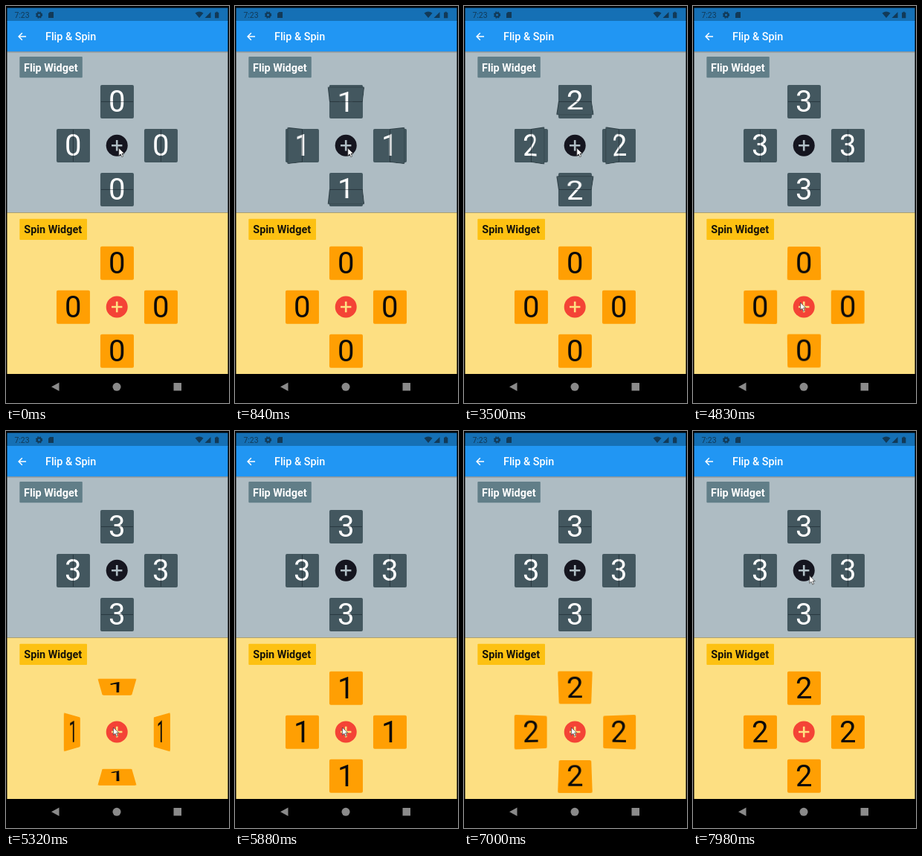
An HTML page that plays this animation: 300x533 px, repeating every 8 s.

```html
<!DOCTYPE html>
<html lang="en">
<head>
<meta charset="utf-8">
<title>Flip &amp; Spin</title>
<style>
  html, body { margin: 0; width: 100%; height: 100%; overflow: hidden; background: #000; }
  #stage { position: relative; width: 300px; height: 533px; overflow: hidden; font-family: Roboto, sans-serif; }
  svg { position: absolute; left: 0; top: 0; }
  .card, .face { position: absolute; left: 0; top: 0; width: 44.5px; height: 44.5px; }
  .face { border-radius: 2px; font: 400 40px/46px Roboto, sans-serif; text-align: center; }
  .flip .face { background: #43575f; color: #fff; }
  .spin .face { background: #ff9f03; color: #0a0a0a; }
  .flap { box-shadow: inset 0 0 0 1px rgba(30, 42, 48, .5); }
  .hinge { position: absolute; background: rgba(12, 22, 27, .45); }
</style>
</head>
<body>
<div id="stage">
  <svg width="300" height="533" viewBox="0 0 300 533">
    <defs>
      <linearGradient id="shade" x2="0" y2="1">
        <stop stop-opacity=".25"/>
        <stop offset="1" stop-opacity="0"/>
      </linearGradient>
    </defs>
    <rect width="300" height="533"/>
    <rect x="1.500" y="2.500" width="297" height="18" fill="#1570b5"/>
    <rect x="1.500" y="20" width="297" height="41" fill="#2196f3"/>
    <rect x="1.500" y="61" width="297" height="216.500" fill="#aebcc3"/>
    <rect x="1.500" y="61" width="297" height="2.500" fill="url(#shade)"/>
    <rect x="1.500" y="277.500" width="297" height="216.500" fill="#fddf82"/>

    <g fill="#123a58">
      <text x="11.500" y="15.900" font-size="10.400">7:23</text>
      <circle cx="44.500" cy="12" r="2.700" fill="none" stroke="#123a58" stroke-width="2.200"/>
      <circle cx="44.500" cy="12" r="4.100" fill="none" stroke="#123a58" stroke-width="1.200" stroke-dasharray="1.650 1.650"/>
      <path d="M59 8H64V16H57V10Z"/>
      <path d="M254.500 9.500Q260 5.500 265.500 9.500L260 16Z"/>
      <path d="M275.500 8V16H267.500Z"/>
      <path d="M281 8.800H282.500V7.800H284.800V8.800H286.300V16.300H281Z"/>
    </g>

    <path d="M27 41H17.500M21.800 36.300L17.100 41L21.800 45.700" fill="none" stroke="#fff" stroke-width="1.500"/>
    <text x="53" y="46" font-size="14.400" font-weight="500" fill="#fff">Flip &amp; Spin</text>

    <rect x="18.300" y="68" width="84.500" height="28.300" rx="1" fill="#617e88"/>
    <text x="24" y="87.500" font-size="14.400" font-weight="700" fill="#fff">Flip Widget</text>
    <rect x="18.300" y="285.700" width="90.700" height="28.300" rx="1" fill="#fdc112"/>
    <text x="24.300" y="305" font-size="14.400" font-weight="700" fill="#15120a">Spin Widget</text>

    <circle cx="149.200" cy="187.300" r="14.500" fill="#15151f"/>
    <path d="M142 187.300H156.400M149.200 180.100V194.500" stroke="#b0bec5" stroke-width="2.600"/>
    <circle cx="149.200" cy="404" r="14.500" fill="#f44336"/>
    <path d="M142 404H156.400M149.200 396.800V411.200" stroke="#ffe082" stroke-width="2.600"/>

    <g fill="#8a8a8a">
      <path d="M61 511.300L71.500 505.500V517Z"/>
      <circle cx="149" cy="511.300" r="5.500"/>
      <rect x="225.500" y="506" width="10.500" height="10.500"/>
    </g>
  </svg>

  <div id="cards"></div>

  <svg width="300" height="533" viewBox="0 0 300 533">
    <path id="cursor" d="M0 0V10.200L2.400 8L4 11.800L5.800 11L4.200 7.300H7.300Z" fill="#fff" stroke="#333" stroke-width=".7"/>
  </svg>
</div>

<script>
const LOOP = 8000, STEP = 70, TURN = 1000, SIZE = 44.5, REACH = 59;
const FLIPS = [150, 1686, 3156];
const SPINS = [4725, 6188];

// Direction from the button, rotation axis and sign, clips of the two halves
const SIDES = [
  { x: 0, y: -1, axis: 'X', sign: 1, outer: '0 0 50% 0', inner: '50% 0 0 0' },
  { x: 0, y: 1, axis: 'X', sign: -1, outer: '50% 0 0 0', inner: '0 0 50% 0' },
  { x: -1, y: 0, axis: 'Y', sign: -1, outer: '0 50% 0 0', inner: '0 0 0 50%' },
  { x: 1, y: 0, axis: 'Y', sign: 1, outer: '0 0 0 50%', inner: '0 50% 0 0' }
];

const cardRoot = document.getElementById('cards');
const cursor = document.getElementById('cursor');

function add(parent, className) {
  const el = document.createElement('div');
  el.className = className;
  return parent.appendChild(el);
}

function makeCard(kind, side, cy) {
  const el = add(cardRoot, 'card ' + kind);
  const x = 149.2 + side.x * REACH - SIZE / 2, y = cy + side.y * REACH - SIZE / 2;
  el.style.transform = `translate(${x}px, ${y}px)`;
  return el;
}

function tilt(side, angle) {
  return `perspective(143px) rotate${side.axis}(${side.sign * angle}deg)`;
}

function makeFlip(side) {
  const el = makeCard('flip', side, 187.2);
  const under = add(el, 'face'), old = add(el, 'face'), flap = add(el, 'face flap');
  const hinge = add(el, 'hinge');
  old.style.clipPath = `inset(${side.outer})`;
  hinge.style.cssText = side.axis === 'X'
    ? 'left:1px;right:1px;top:22px;height:1px'
    : 'top:1px;bottom:1px;left:22px;width:1px';
  return ({ from, to, angle }) => {
    const late = angle > 90;
    under.textContent = to;
    old.textContent = from;
    old.style.visibility = flap.style.visibility = from === to ? 'hidden' : 'visible';
    flap.textContent = late ? to : from;
    flap.style.clipPath = `inset(${late ? side.outer : side.inner})`;
    flap.style.transform = tilt(side, late ? angle - 180 : angle);
  };
}

function makeSpin(side) {
  const face = add(makeCard('spin', side, 404), 'face');
  return ({ from, to, angle }) => {
    const late = angle > 90;
    face.textContent = late ? to : from;
    face.style.transform = angle ? tilt(side, late ? angle - 180 : angle) : 'none';
  };
}

// Cubic ease-in-out (.42, 0, .58, 1)
function ease(x) {
  let lo = 0, hi = 1;
  for (let i = 0; i < 24; i++) {
    const s = (lo + hi) / 2, r = 1 - s;
    if (1.26 * s * r * r + 1.74 * s * s * r + s * s * s < x) lo = s; else hi = s;
  }
  return lo * lo * (3 - 2 * lo);
}

function turnAt(starts, t) {
  const n = starts.filter(s => s <= t).length;
  const p = n ? (t - starts[n - 1]) / TURN : 1;
  return p >= 1 ? { from: n, to: n, angle: 0 } : { from: n - 1, to: n, angle: 180 * ease(p) };
}

function glide(t, start, end, a, b) {
  const p = ease(Math.min(1, Math.max(0, (t - start) / (end - start))));
  return a.map((v, i) => v + (b[i] - v) * p);
}

function cursorAt(t) {
  return t < 6000
    ? glide(t, 4220, 4620, [151.8, 190.8], [144.4, 398])
    : glide(t, 7580, 7960, [144.4, 398], [156.8, 194.3]);
}

const flips = SIDES.map(makeFlip);
const spins = SIDES.map(makeSpin);

function render(t) {
  const flip = turnAt(FLIPS, t), spin = turnAt(SPINS, t);
  flips.forEach(draw => draw(flip));
  spins.forEach(draw => draw(spin));
  cursor.setAttribute('transform', `translate(${cursorAt(t).join(' ')})`);
}

const begin = performance.now();
function tick() {
  const t = (performance.now() - begin) % LOOP;
  render(Math.floor(t / STEP) * STEP);
  requestAnimationFrame(tick);
}
tick();
</script>
</body>
</html>
```
